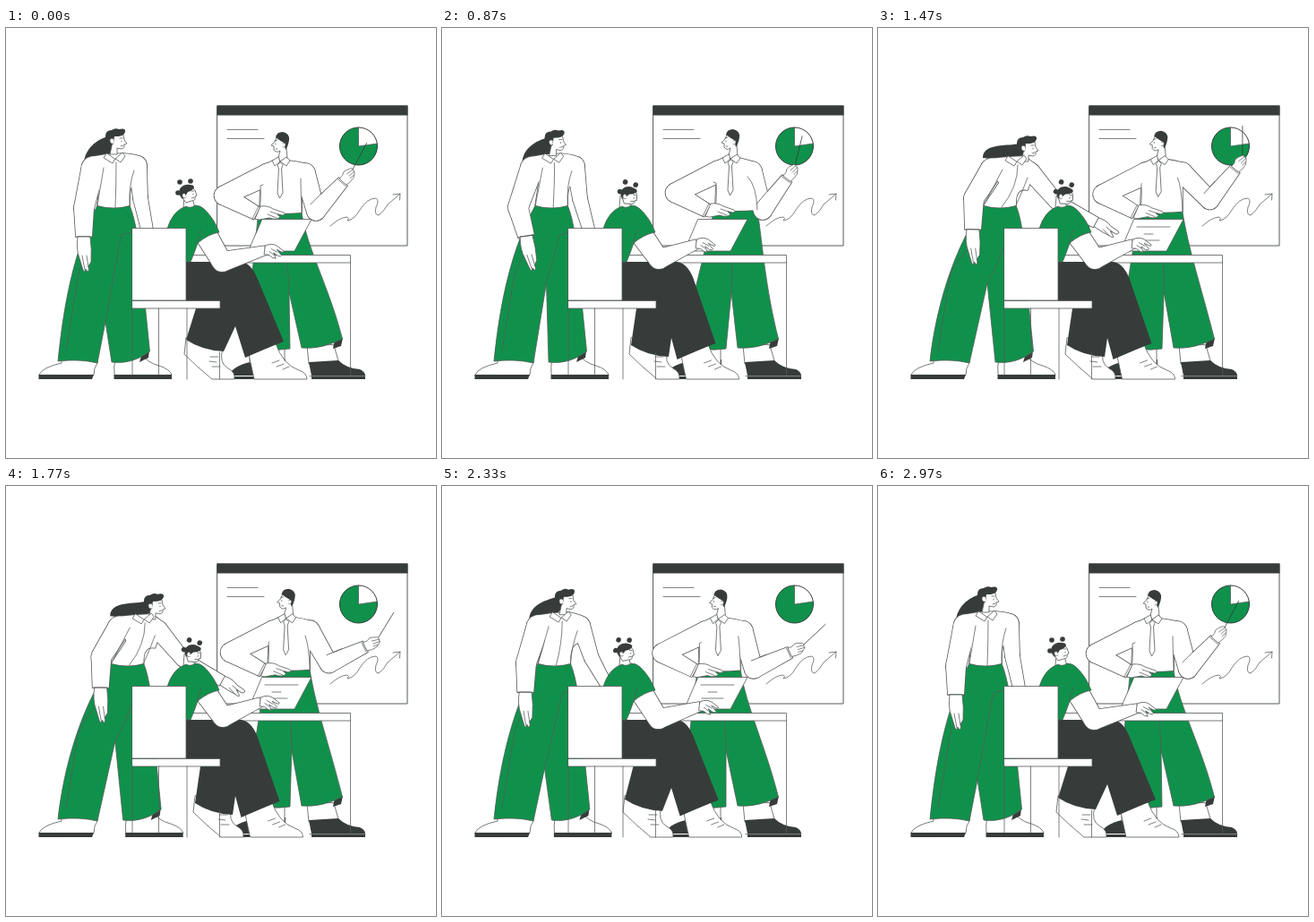
Recreate the animation shown at these times as an HTML page with a canvas. Size 480x480 px, loop 3.03 s.

```html
<!DOCTYPE html>
<html lang="en">
<head>
<meta charset="utf-8">
<title>Team meeting</title>
<style>
html, body { margin: 0; width: 100%; height: 100%; overflow: hidden; background: #fff; }
canvas { display: block; width: 480px; height: 480px; }
</style>
</head>
<body>
<canvas id="stage"></canvas>
<script>
const INK = '#373c3a', GREEN = '#10914b', WHITE = '#fff', LINE = '#555a58';
const LOOP = 3030;

// sway: presenter's weight shift; lean: standing colleague; nod: typist;
// forearm and stick: degrees above the horizon; lift: elbow raised outward.
const REST = { sway: 0, lean: 0, nod: 0, forearm: 48, stick: 62, lift: 0 };
const POSES = [
  { at: 0, ...REST },
  { at: 330, sway: 0.72, lean: -0.13, nod: 0.35, forearm: 67, stick: 90, lift: 0.3 },
  { at: 870, sway: 1, lean: 0.08, nod: 1, forearm: 53, stick: 76, lift: 0 },
  { at: 1470, sway: 0.45, lean: 1, nod: 1, forearm: 51, stick: 90, lift: 1 },
  { at: 2070, sway: 0.38, lean: 0.91, nod: 1, forearm: 1, stick: 27, lift: 0 },
  { at: 2330, sway: 0.15, lean: 0.34, nod: 0.3, forearm: 25, stick: 43, lift: 0 },
  { at: 2970, ...REST }
];

const canvas = document.getElementById('stage');
const ctx = canvas.getContext('2d');
const ratio = window.devicePixelRatio || 1;
canvas.width = canvas.height = 480 * ratio;

// Monotone cubic through the poses: no overshoot, still poses stay still.
function drive(key, t) {
  const last = POSES.length - 1;
  const slope = i => (POSES[i + 1][key] - POSES[i][key]) / (POSES[i + 1].at - POSES[i].at);
  const tangent = i => {
    if (i === 0 || i === last) return 0;
    const a = slope(i - 1), b = slope(i);
    return a * b <= 0 ? 0 : 2 * a * b / (a + b);
  };
  let k = 0;
  while (k < last - 1 && t > POSES[k + 1].at) k++;
  const span = POSES[k + 1].at - POSES[k].at;
  const u = Math.min(1, (t - POSES[k].at) / span), v = 1 - u;
  return v * v * (1 + 2 * u) * POSES[k][key] + u * u * (3 - 2 * u) * POSES[k + 1][key]
    + span * u * v * (v * tangent(k) - u * tangent(k + 1));
}

const ramp = (t, from, to) => Math.max(0, Math.min(1, (t - from) / (to - from)));
const radians = degrees => degrees * Math.PI / 180;

// A joint has x and y, and gives "x y" path text when called with an offset.
const joint = (x, y) => Object.assign((dx = 0, dy = 0) => `${x + dx} ${y + dy} `, { x, y });
const polar = (p, degrees, length) =>
  joint(p.x + length * Math.cos(radians(degrees)), p.y - length * Math.sin(radians(degrees)));
const aim = (a, b) => Math.atan2(b.y - a.y, b.x - a.x);

function draw(d, fill, stroke = LINE, width = 0.8) {
  const path = new Path2D(d);
  if (fill) { ctx.fillStyle = fill; ctx.fill(path); }
  if (stroke) { ctx.strokeStyle = stroke; ctx.lineWidth = width; ctx.stroke(path); }
}
const line = (d, width = 0.75) => draw(d, null, LINE, width);
const solid = (d, fill = INK) => draw(d, fill, null);

function disc(x, y, r, fill, stroke) {
  ctx.beginPath();
  ctx.arc(x, y, r, 0, 7);
  if (fill) { ctx.fillStyle = fill; ctx.fill(); }
  if (stroke) { ctx.strokeStyle = stroke; ctx.lineWidth = 1; ctx.stroke(); }
}

function at(p, angle, paint) {
  ctx.save();
  ctx.translate(p.x, p.y);
  ctx.rotate(angle);
  paint();
  ctx.restore();
}

// Tapered limb segment, round at the start and flat at the end.
function bone(a, ra, b, rb) {
  const n = aim(a, b) + Math.PI / 2, c = Math.cos(n), s = Math.sin(n);
  const ball = new Path2D(), bar = new Path2D();
  ball.arc(a.x, a.y, ra, 0, 7);
  bar.moveTo(a.x + c * ra, a.y + s * ra);
  bar.lineTo(b.x + c * rb, b.y + s * rb);
  bar.lineTo(b.x - c * rb, b.y - s * rb);
  bar.lineTo(a.x - c * ra, a.y - s * ra);
  bar.closePath();
  return [ball, bar];
}

// One white outline around several overlapping parts.
function merge(...parts) {
  const paths = parts.flat();
  ctx.strokeStyle = LINE;
  ctx.lineWidth = 1.6;
  paths.forEach(path => ctx.stroke(path));
  ctx.fillStyle = WHITE;
  paths.forEach(path => ctx.fill(path));
}

function board() {
  draw('M236 87H448V243H236Z', WHITE, LINE, 1);
  solid('M235.5 86.5H448.5V97.5H235.5Z');
  line('M247 113.5H281M247 123.5H288');
  solid('M393.5 132V111A21 21 0 1 0 414.3 129Z', GREEN);
  disc(393.5, 132, 21, null, INK);
  line('M393.5 111V132L414.5 129');
  line('M362 221Q373 211 381 211Q384 212 381 215Q389 214 395 203Q403 190 413 190Q417 192 413 200Q411 209 416 209Q421 206 426 197L440 185M432 186L440 185L439.5 192');
}

function presenterHead(neck) {
  at(neck, 0, () => {
    draw('M-4 -27L-6 -22L-10 -18L-7 -17Q-8 -12 -5 -11Q-2 -10 0 -12L-2 -4L0 0L8 -4L7 -15L5 -28Z', WHITE);
    solid('M-5 -27Q-4 -33 3 -33Q11 -31 10 -24Q9 -17 6 -13L4 -21Q0 -23 -5 -27Z');
    draw('M3 -20Q6 -22 6 -18Q5 -15 3 -16', WHITE, LINE, .6);
    line('M-6 -23L-3 -24M-5 -20V-19M-5 -14L-3 -14');
    draw('M-2 -5L-9 -1L-6 5L0 0L7 5L11 -1L7 -5L0 0Z', WHITE);
    draw('M0 1L-3 4L-1.5 8L-3 35L-.5 41L3 35L1.5 8L3 4Z', WHITE);
  });
}

function presenter({ sway, forearm, stick, lift }) {
  const neck = joint(306 + 16 * sway, 149 - 3 * sway);
  const hip = joint(306 + 22 * sway, 206 - 3 * sway);
  const backShoulder = joint(neck.x - 13, neck.y + 14);
  const backElbow = joint(243 + 17 * sway, 187 - 3 * sway);
  const backWrist = joint(280 + 16 * sway, 207 - 3 * sway);
  const shoulder = joint(334 + 12 * sway, 162 - 2 * sway);
  const elbow = joint(346 + 12 * sway + 19 * lift, 205 - sway - 12 * lift);
  const wrist = polar(elbow, forearm, 45), hand = polar(elbow, forearm, 58);
  const tip = polar(hand, stick, 38);
  const fork = 316 + 7 * sway;

  draw('M336 354L338 375H372L366 354Z', WHITE);
  solid('M338 373L371 371Q380 380 395 381Q401 384 401 388H341Z');
  solid('M341 389H401V392H341Z');
  solid('M249 388Q252 378 272 373L300 369L312 370V388Z');
  solid('M249 389H311V392H249Z');
  draw('M272 354V374Q290 375 299 369L311 376V354Z', WHITE);
  solid('M365 358L367 348L376 346L374 355Z');
  draw(`M${hip(-24)}L${hip(24)}C${hip(30, 40)}361 290 375.5 347Q352 359 330 357L${fork} 295L317 358Q293 362 268 352L${276 + 14 * sway} 262Z`, GREEN);
  line(`M${313 + 12 * sway} 255Q${fork} 280 ${fork} 297`);

  const torso = new Path2D(`M${neck(-8, -1)}L${neck(-16, 3)}L${hip(-22, -32)}L${hip(-23)}Q${hip(0, 2)}${hip(24)}L${hip(24, -40)}L${shoulder(8, -7)}Q${shoulder(1, -12)}${neck(9, -1)}Z`);
  merge(torso, bone(backShoulder, 12, backElbow, 10.5), bone(backElbow, 10.5, backWrist, 7.5),
    bone(shoulder, 11, elbow, 10), bone(elbow, 10, wrist, 6.5));
  line(`M${neck(-19, 26)}L${hip(-22, -30)}Q${hip(-21, -18)}${hip(-23)}`);
  line(`M${shoulder(-5, 6)}Q${hip(23, -28)}${hip(24)}`);
  at(elbow, aim(elbow, wrist), () => line('M2 -10L20 -9'));

  draw(`M${hand()}L${tip()}`, null, INK);
  at(wrist, aim(wrist, hand), () => {
    ctx.scale(0.85, 0.85);
    draw('M0 -6L6 -6Q9 -9 14 -7L20 -4Q22 -2 20 0Q21 3 18 4L13 7Q6 8 0 6Z', WHITE);
    line('M11 -3L20 -1M11 1L20 2M10 4L16 5M-2 -7V7');
  });
  at(backWrist, 0, () => {
    draw('M-2 6L4 -8Q13 -9 18 -5L30 -1Q33 2 28 2L23 1L26 4Q22 8 14 5L3 7Z', WHITE);
    line('M15 -2L27 2M12 1L22 5M-5 6L2 -8');
  });
  presenterHead(neck);
}

function desk() {
  draw('M205 253.5H384.5V262H205Z', WHITE);
  line('M384.5 262V388M339 388.5H401');
}

function laptop(grow) {
  draw('M286 213.5H341L322 249H271Z', WHITE);
  if (grow > 0) line(`M289 222H${289 + 37 * grow}M297 230H${297 + 10 * grow}M290 237H${290 + 24 * grow}`);
}

function colleague({ lean, nod }) {
  const crown = joint(122 + 44 * lean, 112 + nod + 7 * lean);
  const collar = joint(122 + 33 * lean, 149 + 3 * lean);
  const pony = joint(87 + 30 * lean, 152 - 7 * lean);
  const waist = joint(120 + 15 * lean + nod, 198);
  const crotch = joint(111 + 6 * lean + 5 * nod, 328 - 43 * nod);
  const shoe = joint(121 + 13 * lean, 387);
  const nearShoulder = joint(97 + 29 * lean + nod, 156 + 2 * lean);
  const nearElbow = joint(87 + 24 * lean - 4 * nod, 201 - 11 * lean);
  const nearWrist = joint(87 + 13 * lean + 6 * nod, 233 - 8 * lean);
  const farShoulder = joint(147 + 24 * lean, 153 + 8 * lean);
  const farElbow = joint(150 + 49 * lean, 190 + 4 * lean);
  const farWrist = joint(160 + 83 * lean, 237 - 20 * lean);

  draw('M37 387Q40 379 62 374V368H102V374Q98 379 98 387Z', WHITE);
  solid('M36.5 387H98L96 392H36.5Z');
  at(shoe, 0, () => {
    draw('M0 0Q-1 -9 1 -18L30 -24Q37 -13 50 -10Q62 -6 64 0Z', WHITE);
    solid('M-.5 0H64V5H-.5Z');
    solid('M28 -14L31 -24L39 -27L38 -19Z');
  });
  draw(`M${waist(-18)}Q${waist(0, 4)}${waist(18)}Q${waist(28, 24)}${shoe(32, -100)}L${shoe(39.5, -26)}Q${shoe(20, -11)}${shoe(-3, -14)}L${crotch()}L102 374Q82 369 58 372C62 335 ${70 + 6 * lean} 258 ${waist(-18)}Z`, GREEN);
  line(`M${waist(20, 30)}L${waist(9, 33)}Q${waist(5, 50)}${crotch()}M67 360L80 280Q84 260 ${nearWrist(6, 10)}`);

  solid(`M${crown(-8, 9)}C${crown(-20, 12)}${pony(0, -17)}${pony()}L${collar(-8, -4)}L${crown(-2, 21)}Z`);
  at(farWrist, aim(farElbow, farWrist), () => {
    draw('M0 -6Q10 -8 17 -4L27 -3Q30 -1 26 1L19 1L25 5Q26 7 20 6L11 6L0 5Z', WHITE);
    line('M13 -1L22 1M11 3L20 6');
  });
  const torso = new Path2D(`M${collar(-10, -8)}L${nearShoulder(-3, -12)}L${nearShoulder(8, 15)}L${waist(-18)}Q${waist(0, 5)}${waist(18)}Q${waist(17, -20)}${farShoulder(-4, 20)}L${farShoulder(6, -8)}Q${farShoulder(0, -12)}${collar(9, -9)}Z`);
  merge(torso, bone(nearShoulder, 12.5, nearElbow, 11), bone(nearElbow, 11, nearWrist, 9),
    bone(farShoulder, 10, farElbow, 8), bone(farElbow, 8, farWrist, 6));
  line(`M${farShoulder(-4, 6)}Q${farShoulder(-10, 22)}${waist(18)}`);
  line(`M${nearShoulder(12, 0)}L${waist(-18)}`);
  line(`M${collar(1, 1)}Q${collar(1, 26)}${waist(2, 2)}`);
  at(nearWrist, (aim(nearElbow, nearWrist) - Math.PI / 2) / 2, () => {
    draw('M-7 0Q-9 14 -5 24L-1 37Q1 41 2 36L4 39Q6 39 5 33L8 28Q9 14 7 0Z', WHITE);
    line('M-2 21L1 37M3 21L5 34M-9 0H9');
  });

  at(crown, 0, () => {
    draw('M-4 9L9 7L10 13L13 17L10 18Q11 22 7 23L2 22L2 29L-6 29L-4 20Z', WHITE);
    solid('M-11 9Q-11 2 -4 2Q0 -1 4 1Q12 -1 11 4Q10 8 4 9L-1 9L-2 17L-5 20L-11 14Z');
    draw('M-2 12Q-6 10 -6 14Q-5 18 -2 17', WHITE, LINE, .6);
    line('M5 11L8 11M7 14V15M6 20L9 19');
  });
  at(collar, 0, () => draw('M-10 -9L-13 -4L-3 2L0 -3L6 1L11 -6L8 -10L0 -3Z', WHITE));
}

function typistHead(nod) {
  at(joint(202 + 6 * nod, 184 + 2 * nod), radians(20 * nod), () => {
    draw('M-3 0L6 -6L9 -3L11 3L9 4Q10 9 5 9L-1 11L-4 7Z', WHITE);
    solid('M-8 3C-11 -5 -4 -10 3 -9Q8 -9 8 -6Q6 -2 1 -1L-2 4L-5 7Z');
    disc(-8, -12, 2.8, INK);
    disc(4, -13, 2.8, INK);
    disc(-10, 0, 2.8, INK);
    draw('M-2 1Q-6 0 -5 4Q-4 7 -1 5', WHITE, LINE, .6);
    line('M5 -2L8 -2M7 1V2M5 6L8 5');
  });
}

function typist({ nod }) {
  const elbow = joint(241 + nod, 261 - 3 * nod);
  const wrist = joint(290 - 5 * nod, 248 - 7 * nod);
  const hemL = joint(201 + 10 * nod, 348 + 6 * nod);
  const hemR = joint(310 - 4.5 * nod, 350 + 2 * nod);

  at(joint(hemL.x, 392), 0, () => {
    draw('M0 -46L-2 -28Q12 -14 29 0H54Q55 -8 47 -12Q36 -18 41 -34Z', WHITE);
    line('M26 -20L34 -19M27 -25H36M29 -14H38');
  });
  at(joint(hemR.x, 392), 0, () => {
    draw('M-39 -28L-33 0H26Q26 -7 17 -10Q-1 -16 -9 -40Z', WHITE);
    line('M-13 -18L-5 -21M-8 -14L0 -17M-1 -11L6 -14');
  });
  solid(`M201 261H262Q273 262 280 278L${hemR()}Q${hemR(-18, 7)}${hemR(-43, 18)}L256 ${333 + 13 * nod}L${hemL(42, 13)}Q${hemL(18, 12)}${hemL()}L${212 + 5 * nod} 313H201Z`);

  merge(bone(joint(225, 234), 12, elbow, 11), bone(elbow, 11, wrist, 5));
  at(wrist, 0.1, () => {
    draw('M-1 -5Q6 -9 12 -6L20 -1Q21 1 17 0L12 -2L18 4Q18 6 14 5L9 2L12 8Q9 9 4 5L-1 5Z', WHITE);
    line('M6 -2L13 1M4 1L9 4');
  });
  draw('M199 188L198 201H211L208 190Z', WHITE);
  draw('M180 224Q186 204 201 199Q206 202 211 198Q217 198 221 202Q232 212 238 228Q226 230 214 240Q210 252 206 261H198V224Z', GREEN);
  line('M214 240Q215 232 218 225');
  typistHead(nod);
}

function chair() {
  draw('M141 223.5H201V304H141Z', WHITE);
  draw('M141 304.5H239V313H141Z', WHITE);
  line('M141 313V387M170.5 313V387M202 313V392M238.5 362V392');
}

function render(t) {
  ctx.setTransform(ratio, 0, 0, ratio, 0, 0);
  ctx.lineJoin = ctx.lineCap = 'round';
  ctx.fillStyle = WHITE;
  ctx.fillRect(0, 0, 480, 480);
  const pose = {};
  for (const key in REST) pose[key] = drive(key, t);
  board();
  presenter(pose);
  desk();
  laptop(Math.min(ramp(t, 950, 1400), ramp(t, 2850, 2450)));
  colleague(pose);
  typist(pose);
  chair();
}

const start = performance.now();
function tick() {
  render((performance.now() - start) % LOOP);
  requestAnimationFrame(tick);
}
tick();
</script>
</body>
</html>
```
